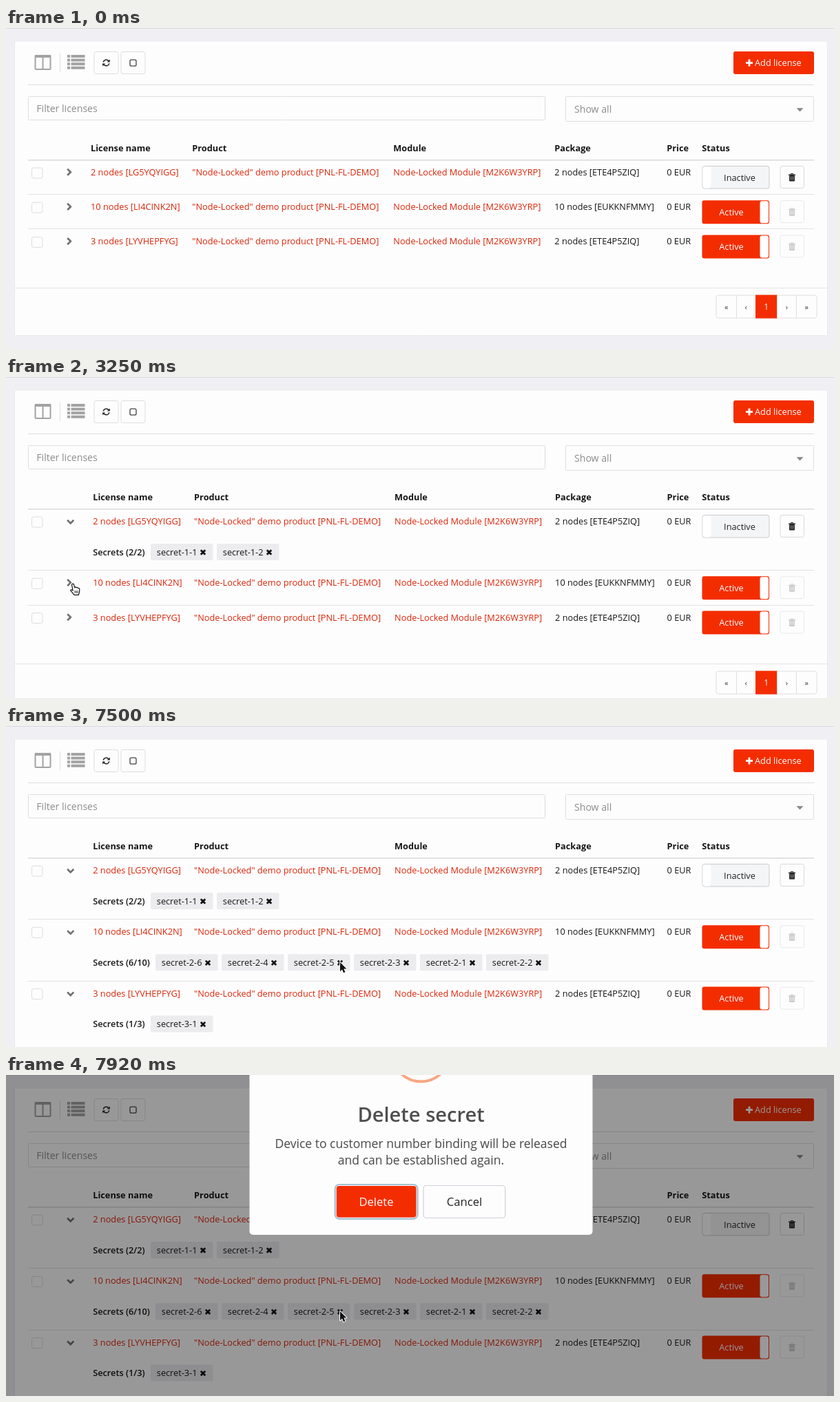
An HTML page with a canvas for the animation above (8000 ms loop, 1202 by 466 pixels).

```html
<!DOCTYPE html>
<html lang="en">
<head>
<meta charset="utf-8">
<title>Licenses</title>
<style>
  html, body { margin: 0; width: 100%; height: 100%; overflow: hidden; background: #f0eff4; }
  canvas { display: block; width: 1202px; height: 466px; }
</style>
</head>
<body>
<canvas id="stage"></canvas>
<script>
const W = 1202, H = 466, LOOP = 8000, FPS = 12;
const RED = '#f42d00', LINK = '#d92608', INK = '#161616', LINE = '#dededf', PANEL = '#fefdfe';
const BODY = 12.75, ROW = 50.2, EXTRA = 39.1;
const MODAL_AT = 7546;

const canvas = document.getElementById('stage');
const c = canvas.getContext('2d');
const dpr = window.devicePixelRatio || 1;
canvas.width = W * dpr;
canvas.height = H * dpr;

const rows = [
  { name: '2 nodes [LG5YQYIGG]', pack: '2 nodes [ETE4P5ZIQ]', active: false, openAt: 2000,
    label: 'Secrets (2/2)', chipX: 210, chips: ['1-1', '1-2'] },
  { name: '10 nodes [LI4CINK2N]', pack: '10 nodes [EUKKNFMMY]', active: true, openAt: 3700,
    label: 'Secrets (6/10)', chipX: 217, chips: ['2-6', '2-4', '2-5', '2-3', '2-1', '2-2'] },
  { name: '3 nodes [LYVHEPFYG]', pack: '2 nodes [ETE4P5ZIQ]', active: true, openAt: 5300,
    label: 'Secrets (1/3)', chipX: 210, chips: ['3-1'] }
];

// Pointer stops: start time, end time, x, y at the end
const moves = [
  [500, 500, 330, 440], [580, 1240, 92, 209], [2650, 3100, 97, 300],
  [4260, 4600, 95, 390], [5480, 6250, 485, 349], [6500, 6900, 485, 343]
];

const clamp = v => Math.max(0, Math.min(1, v));
const mix = (a, b, k) => a + (b - a) * k;
const smooth = k => k * k * (3 - 2 * k);

// The CSS "ease" curve
function ease(x) {
  if (x <= 0) return 0;
  if (x >= 1) return 1;
  let lo = 0, hi = 1, s = 0.5;
  for (let i = 0; i < 20; i++) {
    s = (lo + hi) / 2;
    const bx = 0.75 * s * (1 - s) * (1 - s) + 0.75 * s * s * (1 - s) + s * s * s;
    if (bx < x) lo = s; else hi = s;
  }
  return 0.3 * s * (1 - s) * (1 - s) + 3 * s * s * (1 - s) + s * s * s;
}

function text(str, x, y, color = INK, size = BODY, weight = 400, align = 'left') {
  c.font = `${weight} ${size}px "Open Sans", sans-serif`;
  c.textAlign = align;
  c.fillStyle = color;
  c.fillText(str, x, y);
}

function rect(x, y, w, h, color) {
  c.fillStyle = color;
  c.fillRect(x, y, w, h);
}

function box(x, y, w, h, r, fill, stroke, width = 1) {
  c.beginPath();
  c.roundRect(x, y, w, h, r);
  if (fill) { c.fillStyle = fill; c.fill(); }
  if (stroke) { c.strokeStyle = stroke; c.lineWidth = width; c.stroke(); }
}

function path(points, color, width, close) {
  c.beginPath();
  points.forEach(([x, y], i) => i ? c.lineTo(x, y) : c.moveTo(x, y));
  if (close) c.closePath();
  c.strokeStyle = color;
  c.lineWidth = width;
  c.stroke();
}

function toolbar() {
  const grey = '#a3a3a3';
  box(42.5, 40, 22, 20, 1.5, null, grey, 2);
  rect(42, 39, 23, 4, grey);
  rect(52.5, 41, 2, 19, grey);
  rect(78, 37, 1, 27, LINE);
  for (let i = 0; i < 4; i++) {
    const y = 39 + i * 5.6;
    rect(89, y, 4, 4, grey);
    rect(94.5, y, 20, 4, grey);
  }
  box(128, 34.5, 35, 32, 3, PANEL, LINE);
  box(167, 34.5, 35, 32, 3, PANEL, LINE);
  refreshIcon(145.5, 50.5);
  box(180, 46.2, 9, 9, 2, null, '#444', 1.3);
  box(1056, 34, 117, 33, 3, RED);
  rect(1074, 49.2, 10, 2.8, '#fff');
  rect(1077.6, 45.6, 2.8, 10, '#fff');
  text('Add license', 1087, 55.2, '#fff');
  rect(32, 82, 1141, 1, '#dcdcde');
}

function refreshIcon(x, y) {
  for (let i = 0; i < 2; i++) {
    c.save();
    c.translate(x, y);
    c.rotate(i * Math.PI);
    c.beginPath();
    c.arc(0, 0, 4.3, Math.PI * 1.06, Math.PI * 1.78);
    c.strokeStyle = '#222';
    c.lineWidth = 1.6;
    c.stroke();
    c.beginPath();
    c.moveTo(5.3, -5);
    c.lineTo(5.3, -1);
    c.lineTo(1.3, -1);
    c.closePath();
    c.fillStyle = '#222';
    c.fill();
    c.restore();
  }
}

function filters() {
  box(32.5, 99.5, 750, 34, 1, PANEL, LINE);
  text('Filter licenses', 44.3, 121.8, '#8c8c8c', 14.1);
  box(812.5, 99.5, 360, 36, 1, PANEL, LINE);
  text('Show all', 825, 123.2, '#8c8c8c', 14.1);
  c.beginPath();
  c.moveTo(1147.5, 116.2);
  c.lineTo(1157.5, 116.2);
  c.lineTo(1152.5, 121.4);
  c.fillStyle = '#888';
  c.fill();
}

function toggle(y, active) {
  if (active) {
    box(1010.5, y, 97.5, 34, 3, RED);
    box(1094.5, y + 1, 12.5, 32, 3, '#fff');
    text('Active', 1053, y + 21.5, '#fff', BODY, 400, 'center');
  } else {
    box(1011, y + 0.5, 97, 32.5, 3, '#f4f5f6', '#c9cbcd');
    box(1011.5, y + 1, 12, 31.5, 3, '#fff');
    text('Inactive', 1065, y + 21.5, '#222', BODY, 400, 'center');
  }
}

function trash(y, on) {
  const color = on ? '#222' : '#c9c9cb';
  box(1124, y + 0.5, 34.5, 32, 3, PANEL, on ? '#d8d8da' : '#e8e8ea');
  rect(1136, y + 12.5, 10, 1.4, color);
  box(1139, y + 11.4, 4, 2, 1, null, color);
  box(1137, y + 14, 8, 8.5, 1, color);
  for (let i = 0; i < 3; i++) rect(1138.6 + i * 2.1, y + 15.4, 0.7, 5.2, on ? '#bbb' : '#fff');
}

function chevron(x, y, open) {
  c.save();
  c.translate(x, y);
  if (open) c.rotate(Math.PI / 2);
  path([[-2.5, -4.6], [2.1, 0], [-2.5, 4.6]], '#707072', 2.7);
  c.restore();
}

function chip(x, y, label) {
  box(x, y, 90.5, 24, 2, '#ecebee');
  text('secret-' + label, x + 8.8, y + 16.6);
  const cx = x + 76, cy = y + 12.5, r = 3.2;
  path([[cx - r, cy - r], [cx + r, cy + r]], '#111', 2.7);
  path([[cx + r, cy - r], [cx - r, cy + r]], '#111', 2.7);
}

function table(t) {
  const dx = t >= rows[0].openAt ? 1 : 0;
  const cols = [123 + 3.2 * dx, 270.3 + 2.8 * dx, 562.3 + 1.8 * dx, 796.3 + 0.8 * dx, 959.2 + 0.4 * dx, 1010.3];
  ['License name', 'Product', 'Module', 'Package', 'Price', 'Status']
    .forEach((h, i) => text(h, cols[i], 179.3, INK, BODY, 700));
  rect(32, 191, 1141, 1.5, '#dadadc');

  let y = 192;
  rows.forEach((row, i) => {
    const open = t >= row.openAt;
    const base = y + 22;
    box(37.5, y + 11, 15.5, 15, 2.5, PANEL, '#dcdcde');
    chevron(open ? 93.7 : 91.7, y + (open ? 18.3 : 17.2), open);
    text(row.name, cols[0], base, LINK);
    text('"Node-Locked" demo product [PNL-FL-DEMO]', cols[1], base, LINK);
    text('Node-Locked Module [M2K6W3YRP]', cols[2], base, LINK);
    text(row.pack, cols[3], base);
    text('0 EUR', cols[4], base);
    toggle(y + 8, row.active);
    trash(y + 8, !row.active);
    if (open) {
      text(row.label, cols[0], base + 44.6, INK, BODY, 600);
      row.chips.forEach((label, k) => chip(row.chipX + k * 96, y + 50, label));
    }
    y += ROW + (open ? EXTRA : 0);
    if (i < 2) rect(32, Math.round(y - 1), 1141, 1, '#e2e2e4');
  });
  return y - 192 - 3 * ROW;
}

function pager(dy) {
  rect(13, Math.round(377 + dy), 1179, 1, '#e2e2e4');
  const y = 388 + dy, edges = [1031, 1060.5, 1088, 1119.5, 1147.5, 1177];
  box(1031, y, 146, 33, 3, PANEL, LINE);
  ['«', '‹', '1', '›', '»'].forEach((s, i) => {
    const on = i === 2, x = edges[i];
    if (on) rect(x, y - 0.5, 31.5, 34, RED);
    else if (i) rect(x - 0.5, y, 1, 33, LINE);
    text(s, (x + edges[i + 1]) / 2, y + 21, on ? '#fff' : '#333', on ? 12 : 11, 400, 'center');
  });
}

function page(t) {
  rect(0, 0, W, H, '#f0eff4');
  rect(0, 0, W, 1, '#d9d8de');
  const dy = EXTRA * rows.filter(r => t >= r.openAt).length;
  box(12.5, 19, 1180, 427.5 + dy, 1, PANEL, '#e9e8ed');
  toolbar();
  filters();
  pager(table(t));
}

function arrow(x, y) {
  c.save();
  c.translate(x, y);
  c.beginPath();
  c.moveTo(0, 0);
  [[0, 13.2], [3, 10.4], [5, 15.2], [7.4, 14.2], [5.4, 9.6], [9.4, 9.4]].forEach(p => c.lineTo(...p));
  c.closePath();
  c.lineJoin = 'round';
  c.strokeStyle = '#fff';
  c.lineWidth = 2;
  c.stroke();
  c.fillStyle = '#111';
  c.fill();
  c.restore();
}

function hand(x, y) {
  c.save();
  c.translate(x, y);
  c.beginPath();
  c.moveTo(-1.5, 1.5);
  c.quadraticCurveTo(0, -1, 1.5, 1.2);
  c.lineTo(2.6, 5.6);
  c.quadraticCurveTo(4, 4.2, 5.2, 5.8);
  c.quadraticCurveTo(6.8, 4.8, 7.6, 6.6);
  c.quadraticCurveTo(9.6, 6, 9.8, 8.4);
  c.quadraticCurveTo(10, 12, 8.4, 16.4);
  c.lineTo(2, 16.4);
  c.quadraticCurveTo(-0.5, 13, -3.2, 10.2);
  c.quadraticCurveTo(-3.4, 7.8, 0, 9.6);
  c.closePath();
  c.fillStyle = '#fff';
  c.fill();
  c.strokeStyle = '#111';
  c.lineWidth = 1.2;
  c.stroke();
  for (let i = 0; i < 3; i++) path([[3 + i * 2, 10.2], [3.2 + i * 2, 13.8]], '#111', 0.9);
  c.restore();
}

function pointer(t) {
  if (t < moves[0][0]) return;
  let [, , x, y] = moves[0];
  for (const [from, to, px, py] of moves.slice(1)) {
    if (t < from) break;
    const k = smooth(clamp((t - from) / (to - from)));
    x = mix(x, px, k);
    y = mix(y, py, k);
  }
  (x < 104 ? hand : arrow)(x, y);
}

function popScale(p) {
  if (p < 0.45) return mix(0.7, 1.05, ease(p / 0.45));
  if (p < 0.8) return mix(1.05, 0.95, ease((p - 0.45) / 0.35));
  return mix(0.95, 1, ease((p - 0.8) / 0.2));
}

function modal(t) {
  const age = t - MODAL_AT;
  if (age < 0) return;
  rect(0, 0, W, H, `rgba(0,0,0,${0.4 * ease(age / 100)})`);
  pointer(t);
  const s = popScale(clamp(age / 300)), cx = 602.5, cy = 60.6;
  c.save();
  c.translate(cx, cy);
  c.scale(s, s);
  c.translate(-cx, -cy);
  box(353.5, -111, 498, 343, 5, '#fefdfe');
  c.beginPath();
  c.arc(cx, -32.5, 42, 0, Math.PI * 2);
  c.strokeStyle = '#f7a783';
  c.lineWidth = 4;
  c.stroke();
  text('Delete secret', cx, 68.3, '#4f4f4f', 29.1, 600, 'center');
  text('Device to customer number binding will be released', cx, 105.6, '#484848', 17.55, 400, 'center');
  text('and can be established again.', cx, 130, '#484848', 17.55, 400, 'center');
  box(477.7, 159, 119.8, 49.8, 6, '#fefdfe', '#a4bfcf', 2.2);
  box(479.7, 161, 115.8, 45.8, 4, RED);
  text('Delete', 537.5, 190.4, '#fff', 16.6, 400, 'center');
  box(606, 160.5, 118.7, 47, 4, '#fefdfe', '#d0d0d6', 1.2);
  text('Cancel', 665.5, 190.4, '#222', 16.6, 400, 'center');
  c.restore();
}

function draw(now) {
  const t = Math.floor((now % LOOP) * FPS / 1000) * 1000 / FPS;
  c.setTransform(dpr, 0, 0, dpr, 0, 0);
  page(t);
  if (t < MODAL_AT) pointer(t);
  modal(t);
  requestAnimationFrame(draw);
}
requestAnimationFrame(draw);
</script>
</body>
</html>
```
